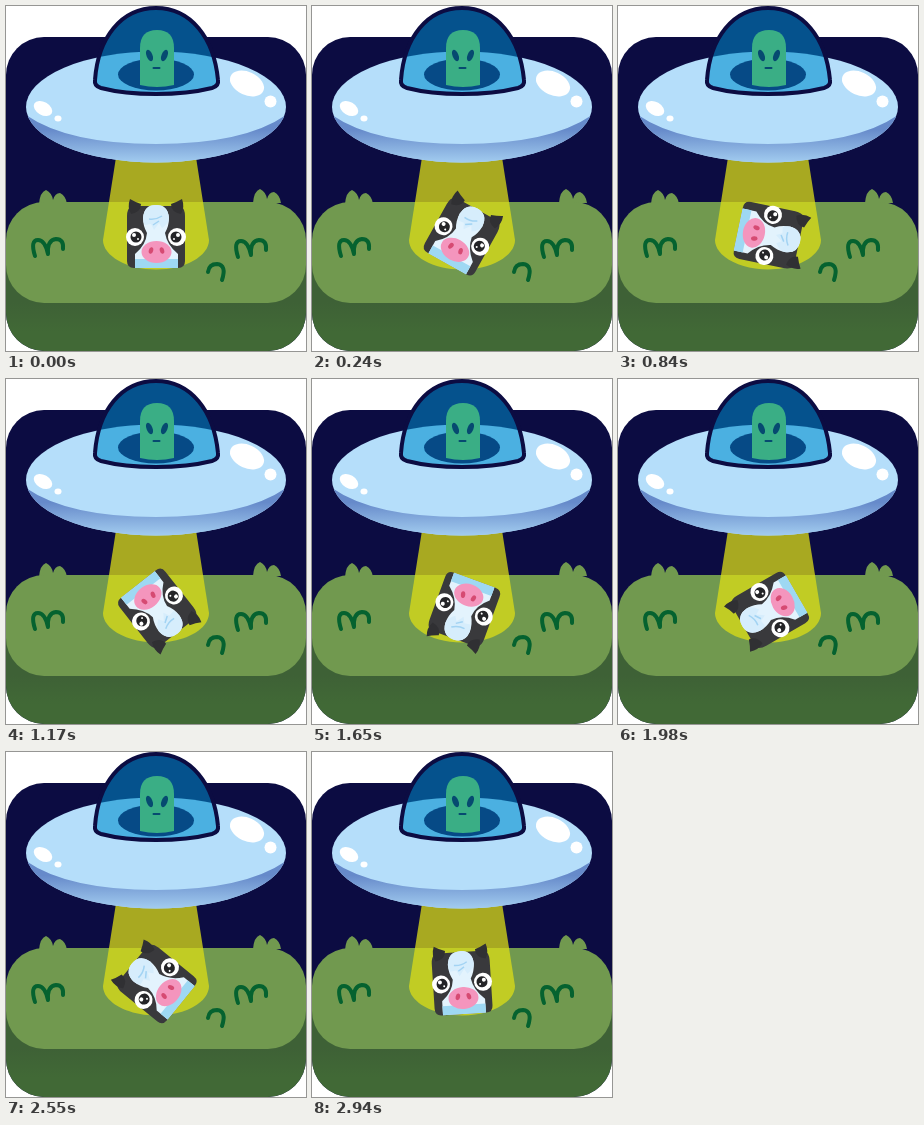
Write an HTML page that moves like this. It is 300 by 345 pixels and loops after 2970 ms.

```html
<!DOCTYPE html>
<html lang="en">
<head>
<meta charset="utf-8">
<title>Cow in a tractor beam</title>
<style>
html, body { margin: 0; width: 100%; height: 100%; overflow: hidden; background: #fff; }
svg { display: block; width: 300px; height: 345px; }
</style>
</head>
<body>
<svg viewBox="0 0 300 345">
  <defs>
    <clipPath id="card"><rect y="31" width="300" height="314" rx="38"/></clipPath>
    <clipPath id="hull"><ellipse cx="150" cy="101" rx="130" ry="55.500"/></clipPath>
    <clipPath id="glass"><path id="dome" d="M89 74C92 32 115 2 150 2S208 32 212 74Q213 80 206 82Q182 88 150 88T95 82Q88 80 89 74Z"/></clipPath>
    <linearGradient id="soil" x2="0" y2="1">
      <stop offset=".5" stop-color="#3e6136"/><stop offset=".8" stop-color="#416936"/>
    </linearGradient>
    <linearGradient id="shade" x2="0" y2="1">
      <stop offset=".3" stop-color="#668aca"/><stop offset="1" stop-color="#a3cdf0"/>
    </linearGradient>
  </defs>

  <g clip-path="url(#card)">
    <rect y="30" width="300" height="315" fill="#0c0c42"/>
    <rect y="247" width="300" height="98" fill="url(#soil)"/>
    <path id="tuft" d="M33 198Q34 186 40 184Q46 187 47 194Q49 187 54 187Q60 190 61 198Z" fill="#71994f"/>
    <use href="#tuft" x="214" y="-1"/>
    <rect y="196" width="300" height="101" rx="38" fill="#71994f"/>
    <g fill="none" stroke="#05622f" stroke-width="4" stroke-linecap="round" stroke-linejoin="round">
      <path id="grass" d="M29 250Q24 234 32 234Q39 234 42 248Q41 234 50 233Q58 233 57 243"/>
      <use href="#grass" x="203" y="1"/>
      <path d="M202 266Q203 258 211 258Q221 259 216 274"/>
    </g>
  </g>

  <path d="M111 145H189L203 234C203 250 179 263.500 150 263.500S97 250 97 234Z" fill="#dcde16" fill-opacity=".75"/>

  <g id="cow">
    <path d="M128 262Q121 262 121 255V210Q121 203 125 200H175Q179 203 179 210V255Q179 262 172 262Z" fill="#39393c"/>
    <path d="M124 193Q129 196 135 198Q135 206 125 208Q121 201 124 193ZM176 193Q171 196 165 198Q165 206 175 208Q179 201 176 193Z" fill="#303033"/>
    <path d="M137 212Q138 199 150 199T163 212Q163 220 159 227Q161 239 172 248V262H129V248Q140 239 141 227Q137 220 137 212Z" fill="#e3f3fd"/>
    <path d="M129 253H172V262H129Z" fill="#9ed8f3"/>
    <path d="M137 212Q138 199 150 199T163 212Q163 217 156 222L153 217L148 224L145 218L139 219Q137 216 137 212Z" fill="#d6edfc"/>
    <path d="M143 213Q150 214 156 210M147 219L153 215" fill="none" stroke="#a2d3f3" stroke-width="1.5"/>
    <g id="eye">
      <circle cx="129" cy="231" r="9" fill="#fff"/>
      <circle cx="130" cy="231" r="5.500" fill="#242427"/>
      <circle cx="128" cy="229" r="2" fill="#fff"/>
      <circle cx="132" cy="233" r="1" fill="#fff"/>
    </g>
    <use href="#eye" transform="matrix(-1 0 0 1 300 0)"/>
    <ellipse cx="150.500" cy="246" rx="15" ry="11" fill="#f495bd"/>
    <g fill="#d64a72">
      <ellipse cx="145" cy="244.500" rx="2.200" ry="3.300" transform="rotate(15 145 244.500)"/>
      <ellipse cx="156" cy="244.500" rx="2.200" ry="3.300" transform="rotate(-15 156 244.500)"/>
    </g>
  </g>

  <g clip-path="url(#hull)">
    <rect x="20" y="41" width="260" height="116" fill="#b5defa"/>
    <path d="M20 109Q62 138 150 138T280 109V157H20Z" fill="url(#shade)"/>
  </g>
  <g fill="#fff">
    <ellipse cx="37" cy="102.500" rx="10" ry="6.500" transform="rotate(30 37 102.500)"/>
    <ellipse cx="52" cy="112.500" rx="3.500" ry="3"/>
    <ellipse cx="241" cy="77.500" rx="18" ry="11.500" transform="rotate(25 241 77.500)"/>
    <circle cx="264.500" cy="95.500" r="6"/>
  </g>

  <g clip-path="url(#glass)">
    <rect x="85" width="130" height="92" fill="#05528d"/>
    <ellipse cx="150" cy="101" rx="130" ry="55.500" fill="#4bb0e1"/>
    <ellipse cx="150" cy="68.500" rx="38" ry="16" fill="#064a86"/>
    <path d="M134 79V42Q134 24 151 24T168 42V79Q151 83 134 79Z" fill="#3aae85"/>
    <g fill="#064a70">
      <ellipse cx="143.500" cy="49.500" rx="3" ry="6" transform="rotate(-22 143.500 49.500)"/>
      <ellipse cx="158.500" cy="49.500" rx="3" ry="6" transform="rotate(22 158.500 49.500)"/>
      <rect x="146.500" y="61" width="8" height="2" rx="1"/>
    </g>
  </g>
  <use href="#dome" fill="none" stroke="#0c0c42" stroke-width="4" stroke-linejoin="round"/>
</svg>
<script>
const LOOP = 2970, STEP = 30;
const cow = document.getElementById("cow");
const start = performance.now();

function draw() {
  const t = Math.max(0, performance.now() - start) % LOOP;
  const angle = Math.floor(t / STEP) * STEP / LOOP * 360;
  cow.setAttribute("transform", `rotate(${angle} 151 230.5)`);
  requestAnimationFrame(draw);
}
draw();
</script>
</body>
</html>
```
